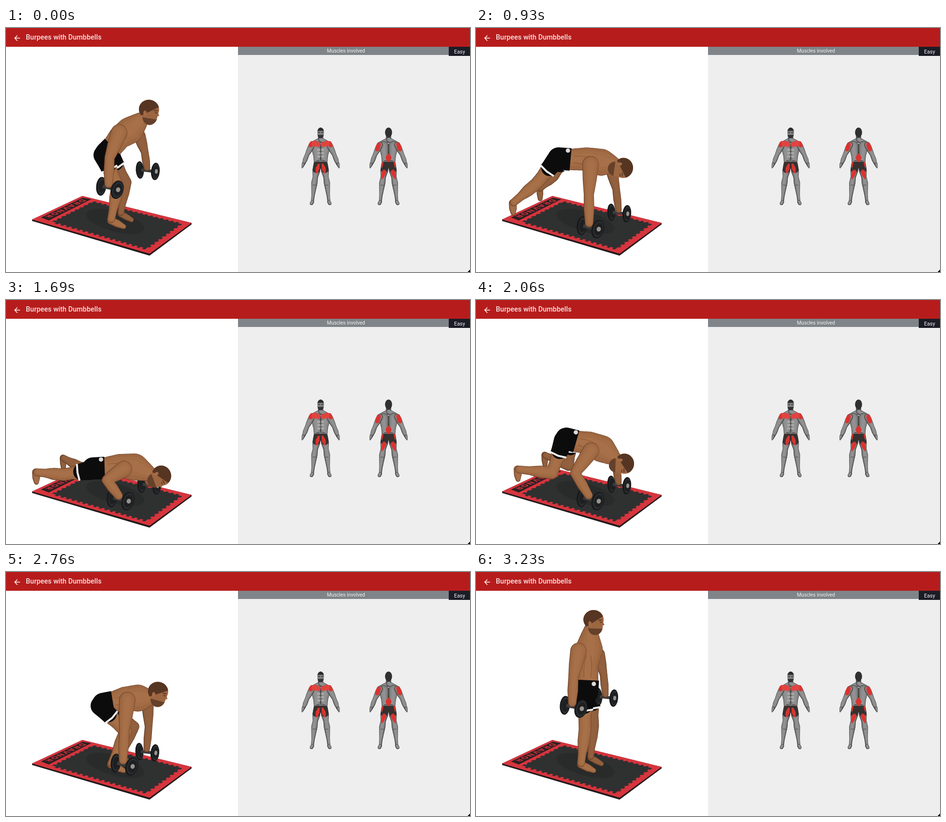
These frames come from a looping animation (960x507 px, 3.3 s). An HTML page with a canvas:

```html
<!DOCTYPE html>
<html lang="en">
<head>
<meta charset="utf-8">
<title>Burpees with Dumbbells</title>
<style>
html, body { margin: 0; width: 100%; height: 100%; overflow: hidden; background: #fff; }
canvas, svg { position: absolute; left: 0; top: 0; display: block; }
text { font-family: Roboto, sans-serif; fill: #f1f1f1; }
</style>
</head>
<body>
<canvas id="stage" width="960" height="507"></canvas>
<svg width="960" height="507" viewBox="0 0 960 507">
  <path transform="translate(14 12) scale(.75)" fill="#fff" d="M20 11H7.83l5.59-5.59L12 4l-8 8 8 8 1.41-1.41L7.83 13H20z"/>
  <text x="41" y="23.5" font-size="14.45" font-weight="500" style="fill:#f6e3e3">Burpees with Dumbbells</text>
  <text x="664" y="51" font-size="10.3">Muscles involved</text>
  <text x="927" y="52.7" font-size="10.9">Easy</text>
</svg>
<script>
const ctx = document.getElementById('stage').getContext('2d');
const LOOP = 3300, STEPS = 43;

const SKIN = ['#6a4128', '#9c6641', '#b57e55'];
const FAR_SKIN = ['#5c3823', '#8c5b3a', '#9c6945'];
const GREY = ['#3c3c3c', '#7a7a7a', '#b4b4b4'];
const BLACK = '#0d0c0d', RED = '#d93431';

const ARM = [17, 14.5, 10.5, 11, 8.5];
const LEG = [18, 16.5, 13, 13, 12.5, 9, 8];
const TRUNK = [22, 24, 28, 20, 11];

// elbow and knee are sideways bends; kick moves the feet apart behind the body
const standing = { foot: [217, 400], kick: 0, tag: 0 };
const behind = { kick: 1, tag: -18 };
const planted = { hand: [234, 408], farHand: [295, 380] };

const bent = { ...standing, hip: [207, 260], chest: [256, 213], head: [295, 175], tilt: .15,
  hand: [212, 326], farHand: [292, 292], elbow: 9, knee: -22 };
const crouch = { ...standing, ...planted, hip: [218, 276], chest: [287, 293], head: [332, 300], tilt: 1.1,
  elbow: 4, knee: -44 };
const plank = { ...behind, ...planted, hip: [171, 271], chest: [259, 279], head: [299, 290], tilt: 1.7,
  foot: [76, 364], elbow: 2, knee: -6 };
const low = { ...behind, ...planted, hip: [180, 350], chest: [266, 347], head: [316, 367], tilt: 1.2,
  foot: [62, 358], elbow: 31, knee: -7 };
const kneel = { ...behind, ...planted, hip: [187, 288], chest: [260, 309], head: [301, 340], tilt: 1.6,
  foot: [86, 352], elbow: 31, knee: -44 };
const lift = { ...standing, hip: [201, 274], chest: [273, 262], head: [313, 254], tilt: .27,
  hand: [242, 394], farHand: [291, 370], elbow: 2, knee: -42 };
const upright = { ...standing, hip: [230, 250], chest: [234, 160], head: [243, 105], tilt: .03,
  hand: [199, 274], farHand: [268, 256], elbow: 4, knee: -5, tag: 13 };

const KEYS = [
  [0, bent], [6, crouch], [7, plank], [13, plank], [16, low], [22, low], [27, kneel],
  [29, plank], [31, plank], [33, crouch], [34, crouch], [36, lift], [42, upright]
];

const mix = (a, b, t) => a.length ? a.map((v, i) => mix(v, b[i], t)) : a + (b - a) * t;
const move = ([x, y], dx, dy) => [x + dx, y + dy];

function along(list, t) {
  const f = t * (list.length - 1), i = Math.min(Math.floor(f), list.length - 2);
  return mix(list[i], list[i + 1], f - i);
}

// point beside the line a-b, at share t of its length
function beside(a, b, t, off) {
  const dx = b[0] - a[0], dy = b[1] - a[1], len = Math.hypot(dx, dy) || 1;
  return move(mix(a, b, t), -dy / len * off, dx / len * off);
}

const bend = (a, b, off) => [a, beside(a, b, .5, off), b];

function poseAt(step) {
  let k = 0;
  while (k < KEYS.length - 2 && KEYS[k + 1][0] <= step) k++;
  const [from, a] = KEYS[k], [to, b] = KEYS[k + 1], pose = {};
  for (const part in a) pose[part] = mix(a[part], b[part], (step - from) / (to - from));
  return pose;
}

function tube(p, w, color, grow = 0, k = 1, dx = 0, dy = 0) {
  ctx.fillStyle = color;
  ctx.beginPath();
  for (let t = 0; t <= 1; t += 1 / 48) {
    const [x, y] = move(along(p, t), dx, dy), r = Math.max(.5, along(w, t) * k + grow);
    ctx.moveTo(x + r, y);
    ctx.arc(x, y, r, 0, 7);
  }
  ctx.fill();
}

function limb(p, w, [edge, base, light]) {
  tube(p, w, edge);
  tube(p, w, base, -.9, 1, .3, -.2);
  ctx.globalAlpha = .22;
  for (const k of [.7, .4]) tube(p, w, light, 0, k, w[0] * .08, -w[0] * .08);
  ctx.globalAlpha = 1;
}

function poly(p, color) {
  ctx.fillStyle = color;
  ctx.beginPath();
  p.forEach(q => ctx.lineTo(...q));
  ctx.closePath();
  ctx.fill();
}

function line(p, color, width) {
  ctx.strokeStyle = color;
  ctx.lineWidth = width;
  ctx.beginPath();
  p.forEach(q => ctx.lineTo(...q));
  ctx.stroke();
}

function oval(x, y, rx, ry, color, turn = 0, from = 0, to = 7) {
  ctx.fillStyle = color;
  ctx.beginPath();
  ctx.ellipse(x, y, rx, ry, turn, from, to);
  ctx.fill();
}

function rect(x, y, w, h, color) {
  ctx.fillStyle = color;
  ctx.fillRect(x, y, w, h);
}

// u runs along the long side of the mat, v along the short one
const onMat = (u, v) => mix(mix([54, 398], [297, 469], u), mix([158, 349], [384, 405], u), v);

function teeth(a, b, count, du, dv) {
  const out = [];
  for (let i = 0; i < count * 2; i++) {
    const lift = i % 2;
    for (const t of [i, i + 1]) {
      const [u, v] = mix(a, b, t / count / 2);
      out.push(onMat(u + du * lift, v + dv * lift));
    }
  }
  return out;
}

function mat() {
  const corners = [onMat(0, 0), onMat(0, 1), onMat(1, 1), onMat(1, 0)];
  poly([...corners.slice(0, 3), move(corners[2], 0, 3), move(corners[3], 0, 4), move(corners[0], 0, 3)], '#211a1b');
  poly(corners, '#d7343d');
  const a = [.14, .1], b = [.935, .1], c = [.935, .91], d = [.14, .91];
  poly([...teeth(a, b, 17, 0, -.035), ...teeth(b, c, 9, .014, 0),
    ...teeth(c, d, 17, 0, .025), ...teeth(d, a, 9, -.012, 0)], '#2f3030');
  oval(226, 402, 62, 21, '#292a2a', .27);
  poly([onMat(.025, .12), onMat(.1, .1), onMat(.095, .97), onMat(.025, .95)], '#2b2022');
  ctx.save();
  ctx.transform(-.905, .425, -.96, -.28, ...onMat(.031, .535));
  ctx.font = '800 14.5px Inter, sans-serif';
  ctx.letterSpacing = '2px';
  ctx.textAlign = 'center';
  ctx.fillStyle = '#c5303a';
  ctx.fillText('DRAVNOR', 0, -1);
  ctx.restore();
}

function plate([x, y], rx, ry, turn, faced) {
  oval(x, y, rx, ry, '#17191b', turn);
  oval(x + 1, y, rx - 2.5, ry - 2.5, '#2c2f31', turn);
  oval(x + 1.5, y, rx * .68, ry * .68, '#1d1f21', turn);
  if (faced) oval(x + 2, y, rx * .34, ry * .26, '#96938f', turn);
}

function head([x, y], tilt) {
  ctx.save();
  ctx.translate(x, y);
  ctx.rotate(tilt);
  oval(0, -6, 21, 20, SKIN[1]);
  oval(4, 8, 15.5, 18, SKIN[1]);
  poly([[17, -6], [23, 4], [17, 7]], SKIN[1]);
  oval(4, 8, 15.5, 18, '#65402a', 0, .25, 2.9);
  oval(0, -6, 21, 20, '#573523', 0, 2.3, 5.9);
  oval(-7, 3, 3.5, 5.5, '#a26c48', -.2);
  line([[10, -5], [18, -6]], '#543322', 1.8);
  line([[13, -1], [18, -1]], '#482b1d', 1.4);
  ctx.restore();
}

function leg(hip, ankle, toe, knee, size, skin) {
  const p = bend(hip, ankle, knee), w = LEG.map(v => v * size);
  limb([ankle, toe], [8 * size, 8 * size, 5], skin);
  limb(p, w, skin);
  return p;
}

function shortsLeg([hip, knee], size) {
  const hem = mix(hip, knee, .44), r = 17.5 * size;
  tube([hip, mix(hip, knee, .32)], [20 * size, r], BLACK);
  const edges = [-r, r].map(off => beside(hip, knee, .44, off));
  poly([beside(hip, knee, .1, -r), beside(hip, knee, .1, r), edges[1], edges[0]], BLACK);
  line([edges[0], beside(hip, knee, .47, 0), edges[1]], '#f3f1ef', 4);
}

function trunk(hip, chest, neck, tag) {
  const waist = mix(hip, chest, .28);
  const [, middle] = bend(waist, chest, -4);
  limb([waist, middle, chest, mix(chest, neck, .5), neck], TRUNK, SKIN);
  for (const off of [-9, 7]) {
    line([.35, .5, .65, .85].map(t => beside(hip, chest, t, off * Math.sin(t * 3))), 'rgba(90,50,26,.3)', 1.5);
  }
  ctx.save();
  ctx.translate(...waist);
  ctx.rotate(Math.atan2(chest[1] - hip[1], chest[0] - hip[0]));
  ctx.beginPath();
  ctx.rect(-90, -90, 90, 180);
  ctx.clip();
  const back = -Math.hypot(waist[0] - hip[0], waist[1] - hip[1]);
  tube([[back, 0], [4, 0]], [23, 23.5], BLACK);
  ctx.restore();
  if (Math.abs(tag) > 8) oval(...beside(hip, chest, .2, tag), 4.5, 4.5, '#dedbd8');
}

function athlete(pose) {
  const { hip, chest, foot, kick, hand, farHand, tilt } = pose;
  const farFoot = move(foot, ...mix([20, -14], [56, -30], kick));
  const toe = mix([27, 13], [1, 21], kick);
  const nape = move(pose.head, -6 * Math.cos(tilt) - 9 * Math.sin(tilt), 9 * Math.cos(tilt) - 6 * Math.sin(tilt));

  const farLeg = leg(move(hip, 10, 2), farFoot, move(farFoot, toe[0] * .85, toe[1]), pose.knee, .84, FAR_SKIN);
  shortsLeg(farLeg, .9);

  plate(move(farHand, -15, 3), 8.5, 18, -.05);
  line([move(farHand, -12, 3), move(farHand, 15, 6)], '#3b3c3d', 6);
  limb(bend(move(chest, 20, 11), farHand, -3), ARM.map(v => v * .75), FAR_SKIN);
  plate(move(farHand, 17, 6), 9, 18, .08, true);

  const nearLeg = leg(move(hip, -6, 4), foot, move(foot, ...toe), pose.knee, 1, SKIN);
  trunk(hip, chest, nape, pose.tag);
  shortsLeg(nearLeg, 1);
  head(pose.head, tilt);

  plate(move(hand, -15, 3), 10.5, 19.5, .1);
  line([move(hand, -12, 3), move(hand, 15, 9)], '#3b3c3d', 7);
  limb(bend(move(chest, -22, 4), hand, pose.elbow), ARM, SKIN);
  plate(move(hand, 18, 10), 13, 19.5, .28, true);
}

function anatomyHalf(back) {
  limb([[7, 284], [13, 322], [17, 360]], [8, 8, 5.5, 6.5, 5, 3.5, 3], GREY);
  limb([[17, 361], [19, 364.5]], [3.5, 3.5], GREY);
  limb([[0, 232], [15, 240]], [5, 5], GREY);
  limb([[10, 245], [6, 282]], [10, 9, 7.5, 7.5, 8], GREY);
  limb([[18, 243], [28, 263], [36, 284]], [6.5, 6, 4.5, 4.8, 2.8], GREY);
  limb([[36, 283], [38, 290]], [3.2, 1.6], GREY);
  tube([[6, 283], [9, 294]], [8, 7.5], '#37312f');
  if (back) {
    tube([[20, 242], [24, 253]], [4, 5, 3.5], RED);
    tube([[12, 280], [14, 290]], [1.6, 1], RED);
    tube([[9, 299], [14, 313]], [4.5, 3.5, 1.5], RED);
  } else {
    tube([[18, 240], [21, 244]], [5, 4], RED);
    tube([[5, 242], [13, 240]], [5, 6], '#e04440');
    for (let y = 253; y < 270; y += 7) oval(4, y, 3.5, 2.8, '#a8a8a8');
    tube([[4, 284], [9, 301]], [2.2, 4, 1.6], RED);
  }
  line([[9, 327], [16, 326]], '#4d4d4d', 1.2);
}

function anatomy(x, back) {
  ctx.save();
  ctx.translate(x, 0);
  tube([[0, 222], [0, 233]], [5, 6], '#555');
  for (const side of [-1, 1]) {
    ctx.save();
    ctx.scale(side, 1);
    anatomyHalf(back);
    ctx.restore();
  }
  line([[0, 236], [0, 274]], '#4d4d4d', 1);
  line([[-13, 277], [13, 277]], '#8c8c8c', 1.5);
  if (back) {
    tube([[0, 262], [0, 277]], [1.5, 6, 2], RED);
    oval(0, 217, 7.3, 10.3, '#303030');
  } else {
    oval(0, 217.5, 7, 10.3, '#808080');
    oval(0, 217.5, 7.3, 10.6, '#2c2c2c', 0, 3.5, 5.9);
    oval(0, 220, 6.8, 9, '#303030', 0, .25, 2.9);
    for (const s of [-1, 1]) line([[s * 5, 216.5], [s * 1.5, 217.5]], '#333', 1.5);
  }
  ctx.restore();
}

function draw(step) {
  rect(0, 0, 960, 507, '#fff');
  rect(480, 39, 480, 468, '#eee');
  rect(480, 39, 480, 17, '#7f8489');
  rect(916, 39, 44, 19, '#1b1d26');
  rect(0, 0, 960, 39, '#b71c1c');
  poly([[960, 502], [960, 507], [955, 507]], '#000');
  anatomy(651, false);
  anatomy(791.5, true);
  mat();
  athlete(poseAt(step));
}

const start = performance.now();
let shown = -1;
function tick() {
  const t = (performance.now() - start) % LOOP;
  const step = Math.min(STEPS - 1, Math.floor((t + 13) * STEPS / LOOP));
  if (step !== shown) draw(shown = step);
  requestAnimationFrame(tick);
}
tick();
</script>
</body>
</html>
```
